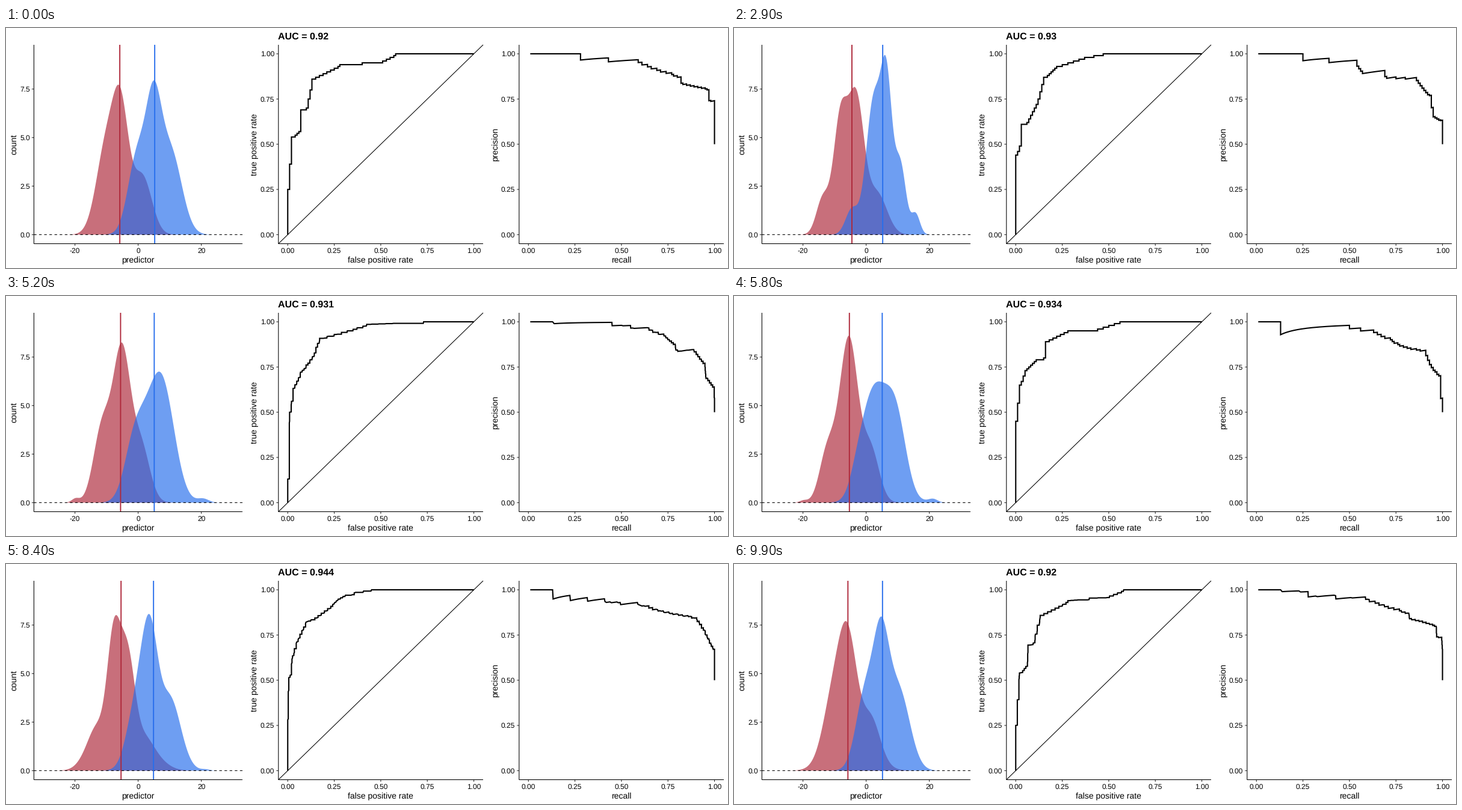
Write a matplotlib script that moves like this. It is 1200 px wide and 400 px high and loops after 10 s.

```python
import numpy as np
import matplotlib.pyplot as plt
from matplotlib.animation import FuncAnimation

W, H, DPI = 1200, 400, 100
PT = 72 / DPI                          # points per pixel
RED, BLUE, ALPHA = "#ae283a", "#276eec", .67
TOP, BOTTOM, ZERO = 28, 359.5, 344.4
STEPS = 7
STARTS = (8, 23, 38, 52, 66, 80, 94)   # first moving frame after each hold
GRID = np.linspace(-32, 32, 385)
N = 100                                # samples per class


def bumps(*parts):
    """Sum of bell curves given as (height, centre, width)."""
    return sum(h * np.exp(-((GRID - c) / w) ** 2 / 2) for h, c, w in parts)


def ranking(*keys):
    """False and true positive counts after each ranked sample, along key points."""
    fp_keys, tp_keys = zip(*keys)
    n = np.arange(N)
    level = np.floor(np.interp(n, fp_keys, tp_keys) + 1e-9).astype(int)
    is_fp = np.zeros(2 * N + 1, int)
    is_fp[n + level + 1] = 1
    fp = np.cumsum(is_fp)
    return fp, np.arange(2 * N + 1) - fp


def state(auc, means, red, blue, ranks):
    return dict(title=f"AUC = {auc}", means=np.array(means), red=red, blue=blue,
                roc=np.array(ranks) / N)


A = state(.92, (-5.8, 5.25),
          bumps((4.6, -10, 3.2), (5.6, -5.4, 2.5), (3, 1.3, 3)),
          bumps((4, -.3, 2.9), (5.85, 4.9, 2.45), (4.25, 10.3, 3.5)),
          ranking((0, 25), (2, 54), (6, 57), (7, 69), (10, 70), (13, 86),
                  (28, 94), (51, 96), (58, 100)))
B = state(.921, (-5.6, 5.8),
          bumps((1, -15.5, 3.2), (6.7, -8.8, 2.9), (2.8, -3.9, 1.9), (3.9, .5, 2.9)),
          bumps((2.5, -2, 2.1), (5.05, 2.9, 1.9), (8.25, 7.2, 2.6), (1.55, 15.2, 2.2)),
          ranking((0, 13), (5, 58), (6, 65), (10, 76), (16, 91), (27, 95), (49, 100)))
C = state(.93, (-4.5, 5.25),
          bumps((1.85, -13.7, 2.05), (5.7, -8.2, 2.2), (6.9, -3.2, 2.5), (2.1, 3.5, 3.1)),
          bumps((1.3, -4.5, 2), (6.9, 2.4, 2.4), (7.2, 6.5, 1.75), (3.6, 10.8, 1.8),
                (1.05, 15.7, 1.35)),
          ranking((0, 44), (2, 49), (3, 61), (6, 62), (12, 75), (15, 87), (22, 93),
                  (37, 98), (47, 100)))
D = state(.931, (-5.6, 5.1),
          bumps((.22, -19.8, 1.2), (4.1, -11.2, 2.8), (7.5, -5.1, 2.7), (2.9, .8, 2.8)),
          bumps((3.2, -1, 3.2), (6.7, 7, 4.1), (.2, 20.5, 1.8)),
          ranking((0, 13), (1, 50), (3, 63), (7, 72), (12, 79), (17, 91), (29, 94),
                  (42, 99), (72, 99), (73, 100)))
F = state(.938, (-5.05, 5.05),
          bumps((1.9, -13, 2.2), (9, -5.7, 2.85), (2.75, 1.8, 2.6)),
          bumps((.8, -3.2, 2), (6.55, 2.3, 3.4), (4.4, 9.9, 3), (.21, 21.4, 1.3)),
          ranking((0, 28), (2, 59), (9, 77), (12, 82), (16, 83), (22, 95), (24, 97),
                  (33, 97), (35, 100)))
G = state(.944, (-5.55, 4.8),
          bumps((2.3, -13.5, 3.5), (6.9, -7.8, 2.1), (5.6, -3, 2.2), (1.3, 3.5, 4.2)),
          bumps((3.9, .3, 3.3), (5.9, 4, 2.4), (3.3, 10.5, 3.5)),
          ranking((0, 52), (1, 53), (2, 64), (4, 72), (9, 83), (22, 89), (31, 97),
                  (45, 100)))
E = state(.934, (-5.3, 5.1),
          (D["red"] + F["red"]) / 2, (D["blue"] + F["blue"]) / 2,
          ranking((0, 45), (2, 65), (5, 73), (11, 79), (15, 80), (16, 89), (28, 95),
                  (41, 95), (56, 100)))

STATES = (A, B, C, D, E, F, G)
# The precision panel shows the same rankings in another order.
for s, shown in zip(STATES, (F, G, A, E, D, C, B)):
    fp, tp = shown["roc"][:, 1:]
    s["pr"] = np.array([tp, tp / (tp + fp)])


def px(v):
    return 219.6 + 5.25 * v


def count_y(v):
    return ZERO - 32.35 * v


def rate_y(v):
    return ZERO - 301.4 * v


def roc_x(v):
    return 468.25 + 309.3 * v


def pr_x(v):
    return 868.25 + 309.3 * v


plt.rcParams.update({"font.family": "Liberation Sans", "text.hinting": "none"})
fig = plt.figure(figsize=(W / DPI, H / DPI), dpi=DPI, facecolor="white")
ax = fig.add_axes([0, 0, 1, 1])
ax.set(xlim=(0, W), ylim=(H, 0))
ax.axis("off")


def line(x, y, width=1.07, color="black", **kw):
    return ax.plot(x, y, color=color, lw=width * PT, snap=False,
                   solid_capstyle="butt", solid_joinstyle="miter", **kw)[0]


def label(x, y, s, size=12, **kw):
    return ax.text(x, y, s, fontsize=size * PT, va="baseline", **kw)


def panel(left, right, x_map, y_map, x_ticks, y_ticks, x_fmt, y_fmt,
          x_name, y_name, y_name_x):
    line([left, left, right], [TOP, BOTTOM, BOTTOM], zorder=5)
    for v in x_ticks:
        line([x_map(v)] * 2, [BOTTOM, BOTTOM + 3.5], color="#333333")
        label(x_map(v), 374.5, f"{v:{x_fmt}}", ha="center")
    for v in y_ticks:
        line([left - 3.5, left], [y_map(v)] * 2, color="#333333")
        label(left - 6.5, y_map(v) + 4.3, f"{v:{y_fmt}}", ha="right")
    label((left + right) / 2, 391, x_name, 14, ha="center")
    label(y_name_x, 194, y_name, 14, ha="center", rotation=90,
          rotation_mode="anchor")


quarters = np.linspace(0, 1, 5)
panel(46.4, 393, px, count_y, (-20, 0, 20), np.arange(0, 8, 2.5), "d", ".1f",
      "predictor", "count", 17)
panel(452.8, 793, roc_x, rate_y, quarters, quarters, ".2f", ".2f",
      "false positive rate", "true positive rate", 417)
panel(852.8, 1193, pr_x, rate_y, quarters, quarters, ".2f", ".2f",
      "recall", "precision", 817)

fills = [ax.fill([0, 1, 1], [0, 0, 1], color=c, alpha=ALPHA, lw=0, zorder=2)[0]
         for c in (RED, BLUE)]
line([46.4, 393], [ZERO, ZERO], ls=(0, (4, 4)), dash_capstyle="butt", zorder=3)
marks = [line([0, 0], [TOP, BOTTOM], 1.9, c, zorder=4) for c in (RED, BLUE)]
line([452.8, 793], [BOTTOM, TOP], zorder=3)
roc = line([], [], 2.1, zorder=4)
pr = line([], [], 2.1, zorder=4)
title = label(452.5, 19, "", 16, weight="bold")


def draw(frame):
    i, k = 0, STEPS                    # resting on the first state
    for n, start in enumerate(STARTS, 1):
        if frame >= start:
            i, k = n, min(frame - start + 1, STEPS)
    old, new = STATES[i - 1], STATES[i % len(STATES)]
    t = k / STEPS

    def mix(key):
        return old[key] * (1 - t) + new[key] * t

    for fill, key in zip(fills, ("red", "blue")):
        fill.set_xy(np.column_stack([px(GRID), count_y(mix(key))]))
    for mark, m in zip(marks, mix("means")):
        mark.set_xdata([px(m)] * 2)
    x, y = mix("roc")
    roc.set_data(roc_x(x), rate_y(y))
    x, y = mix("pr")
    pr.set_data(pr_x(x), rate_y(y))
    title.set_text((new if t > .5 else old)["title"])
    return [*fills, *marks, roc, pr, title]


anim = FuncAnimation(fig, draw, frames=100, interval=100, repeat=True,
                     repeat_delay=0, init_func=lambda: draw(0), blit=False)
plt.show()
```
